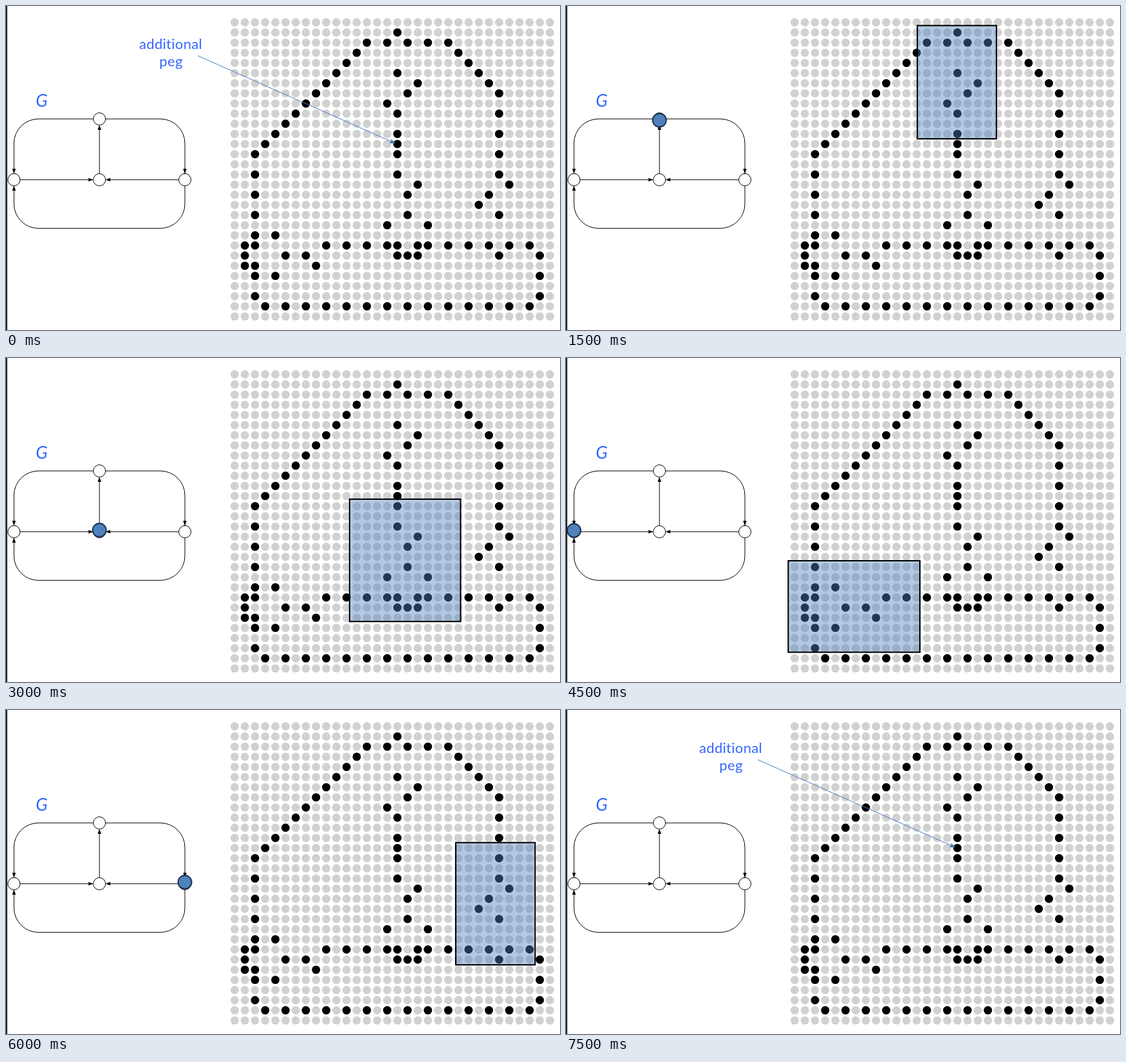
An HTML page with a canvas that plays this animation: 861 px wide and 505 px high, repeating every 9 s.

```html
<!DOCTYPE html>
<html lang="en">
<head>
<meta charset="utf-8">
<title>Peg board and graph</title>
<style>
html, body { margin: 0; width: 100%; height: 100%; overflow: hidden; background: #fff; }
canvas { display: block; width: 861px; height: 505px; }
</style>
</head>
<body>
<canvas id="stage"></canvas>
<script>
const W = 861, H = 505, STEP_MS = 1500, LOOP_MS = 9000;
const COLS = 32, ROWS = 30, PITCH = 15.806, PEG_R = 6.45;
const FONT = '"Comic Sans MS", Lato, sans-serif';
const left = 12.4, right = 278, top_ = 176, mid = 270.8, bottom = 346.5, cx = 145.2;

const canvas = document.getElementById('stage');
const dpr = window.devicePixelRatio || 1;
canvas.width = Math.round(W * dpr);
canvas.height = Math.round(H * dpr);
const ctx = canvas.getContext('2d');
ctx.scale(dpr, dpr);

// Graph nodes in the order they light up, each with its board region
const nodes = [
  { x: cx, y: top_, shift: 2, box: [546, 30.5, 123, 176.5] },
  { x: cx, y: mid, shift: -2.5, box: [534, 220, 172.5, 190.7] },
  { x: left, y: mid, shift: -2, box: [345.4, 316, 204.6, 142.6] },
  { x: right, y: mid, shift: -2.5, box: [699, 206.7, 123.3, 190.5] }
];

function disc(x, y, r, fill, stroke, width) {
  ctx.beginPath();
  ctx.arc(x, y, r, 0, Math.PI * 2);
  ctx.fillStyle = fill;
  ctx.fill();
  if (stroke) {
    ctx.strokeStyle = stroke;
    ctx.lineWidth = width;
    ctx.stroke();
  }
}

function arrow(x1, y1, x2, y2, color, size, half) {
  const a = Math.atan2(y2 - y1, x2 - x1);
  ctx.strokeStyle = ctx.fillStyle = color;
  ctx.lineWidth = 1;
  ctx.beginPath();
  ctx.moveTo(x1, y1);
  ctx.lineTo(x2 - Math.cos(a) * size, y2 - Math.sin(a) * size);
  ctx.stroke();
  ctx.save();
  ctx.translate(x2, y2);
  ctx.rotate(a);
  ctx.beginPath();
  ctx.moveTo(0, 0);
  ctx.lineTo(-size, -half);
  ctx.lineTo(-size, half);
  ctx.fill();
  ctx.restore();
}

function label(text, x, y, font) {
  ctx.font = font + ' ' + FONT;
  ctx.letterSpacing = '0.3px';
  ctx.fillStyle = '#3366ff';
  ctx.textAlign = 'center';
  ctx.fillText(text, x, y);
}

function peg(col, row, fill = '#000') {
  disc(355.4 + col * PITCH, 25.5 + row * PITCH, PEG_R, fill);
}

const gcd = (a, b) => b ? gcd(b, a % b) : a;

// Pegs along a path: every second hole on straights, every hole met on slants
function trail(...points) {
  peg(...points[0]);
  for (let k = 1; k < points.length; k++) {
    const [x, y] = points[k - 1];
    const dx = points[k][0] - x, dy = points[k][1] - y;
    const span = gcd(Math.abs(dx), Math.abs(dy));
    const n = dx && dy ? span : span / 2;
    for (let i = 1; i <= n; i++) peg(x + dx * i / n, y + dy * i / n);
  }
}

// U-shaped detour around a hole, bulging toward (dx, dy)
function detour(col, row, dx, dy) {
  for (let i = -1; i <= 1; i++) {
    const x = col + i * dy, y = row + i * dx;
    peg(x + dx, y + dy);
    if (i) peg(x, y);
  }
}

function drawBoard() {
  for (let row = 0; row < ROWS; row++)
    for (let col = 0; col < COLS; col++) peg(col, row, '#d1d1d1');
  // arch
  trail([2, 21], [2, 13], [13, 2], [21, 2], [26, 7], [26, 15],
    [27, 16], [25, 17], [24, 18], [26, 19]);
  // centre strand
  trail([16, 5], [18, 6], [17, 7], [15, 8], [16, 9], [16, 15],
    [18, 16], [17, 17], [17, 19], [15, 20]);
  // base loop
  trail([19, 20], [19, 22], [29, 22], [30, 23], [30, 27], [29, 28], [3, 28],
    [2, 27], [2, 25], [4, 25], [5, 23], [4, 21]);
  trail([15, 22], [9, 22], [8, 24], [7, 23]);
  detour(17, 22, 0, 1);
  detour(2, 23, -1, 0);
  // single pegs
  peg(16, 1);
  peg(16, 12);
  peg(26, 23);
}

function drawGraph() {
  ctx.strokeStyle = '#000';
  ctx.lineWidth = 1;
  ctx.beginPath();
  ctx.roundRect(left, top_, right - left, bottom - top_, 38);
  ctx.stroke();
  const edge = (...ends) => arrow(...ends, '#000', 7.5, 2.8);
  const gap = 9.5;
  for (const x of [left, right]) {
    edge(x, mid - gap - 8, x, mid - gap);
    edge(x, mid, cx + Math.sign(x - cx) * gap, mid);
  }
  edge(left, mid + gap + 8, left, mid + gap);
  edge(cx, mid, cx, top_ + gap);
  for (const { x, y } of nodes) disc(x, y, 9.5, '#fff', '#000', 1);
  label('G', 55.5, 157, 'italic 27px');
}

function drawNote() {
  label('additional', 256, 67, '22px');
  label('peg', 256.5, 93.5, '22px');
  arrow(298, 77.5, 605, 214, '#4a7ebb', 8, 3.6);
}

function drawMark({ x, y, shift, box }) {
  disc(x, y + shift, 10.5, '#4f81bd', '#1c334e', 2);
  ctx.fillStyle = 'rgba(79, 129, 189, 0.43)';
  ctx.fillRect(...box);
  ctx.strokeStyle = '#000';
  ctx.lineWidth = 2.1;
  ctx.strokeRect(...box);
}

function frame() {
  const step = Math.floor((performance.now() % LOOP_MS) / STEP_MS);
  const node = nodes[step - 1];
  ctx.fillStyle = '#fff';
  ctx.fillRect(0, 0, W, H);
  drawGraph();
  drawBoard();
  if (node) drawMark(node);
  else drawNote();
  ctx.fillStyle = '#222';
  ctx.fillRect(0, 0, 2, H);
  requestAnimationFrame(frame);
}
frame();
</script>
</body>
</html>
```
